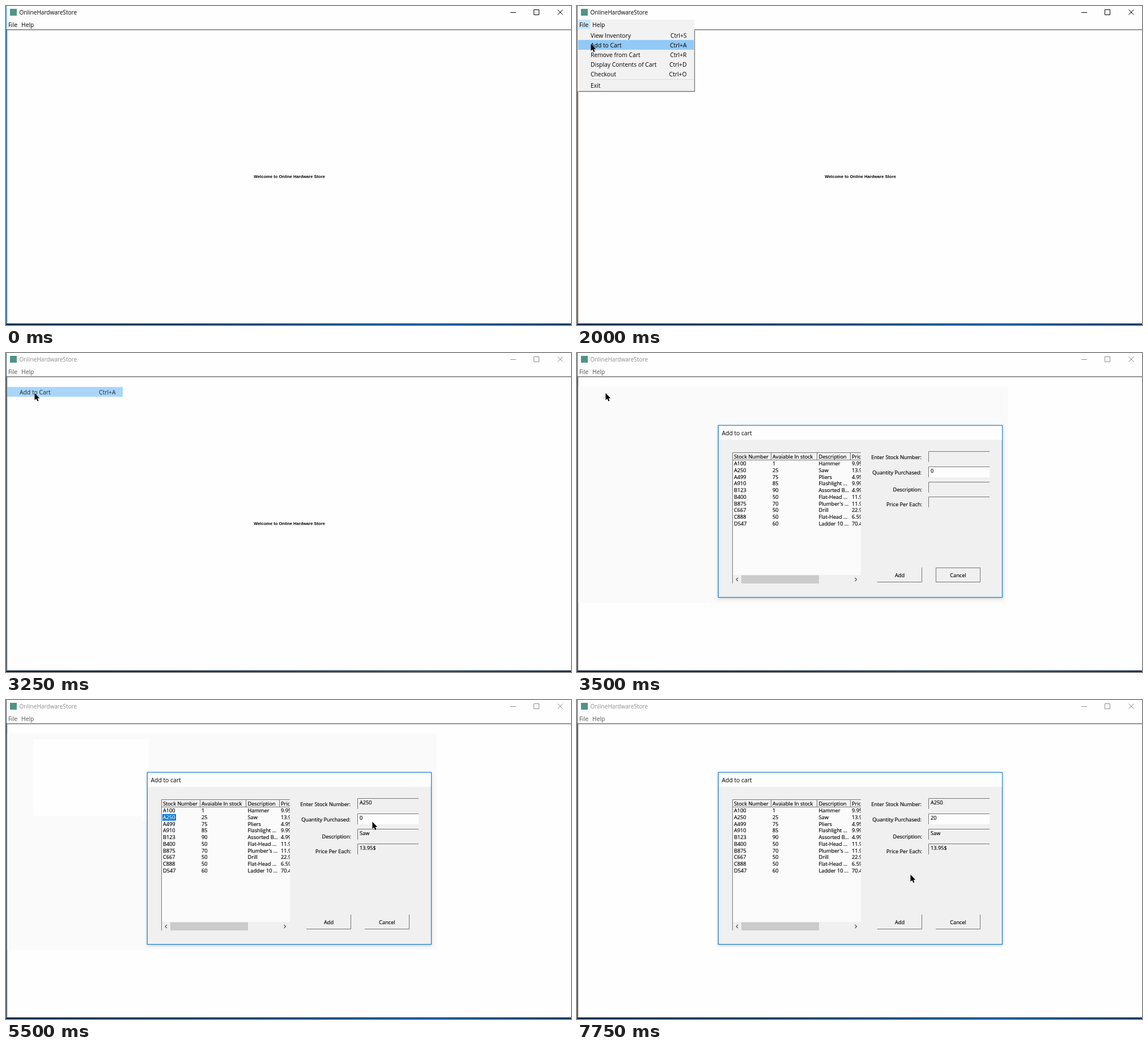
An HTML page that plays this animation: 997 px wide and 562 px high, repeating every 8000 ms.

```html
<!DOCTYPE html>
<html lang="en">
<head>
<meta charset="utf-8">
<title>Hardware store window</title>
<style>
  html, body { margin: 0; width: 100%; height: 100%; overflow: hidden; background: #fff; }
  svg { display: block; width: 997px; height: 562px; }
  text { font: 10.35px "Open Sans", "Noto Sans", sans-serif; fill: #000; white-space: pre; }
  #caption { font-size: 10.05px; }
  .form text { font-size: 9.2px; stroke: #000; stroke-width: .18px; }
  #welcome { font: bold 7.56px "Liberation Sans", Arial, sans-serif; text-anchor: middle; }
  .right { text-anchor: end; }
  .mid { text-anchor: middle; }
  .line { fill: none; stroke: #757575; }
  #controls { fill: none; stroke: #000; }
  #edge { fill: #1a82d4; }
  .inactive #caption { fill: #8c8c8c; }
  .inactive #bar text { fill: #555; }
  .inactive #controls { stroke: #8c8c8c; }
  .inactive #edge { fill: #4a5560; }
  .hidden { display: none; }
</style>
</head>
<body>
<svg id="stage" viewBox="0 0 997 562">
  <defs>
    <linearGradient id="desk">
      <stop offset="0" stop-color="#0a2440"/>
      <stop offset=".35" stop-color="#0a365f"/>
      <stop offset=".75" stop-color="#0f559a"/>
      <stop offset="1" stop-color="#0a3058"/>
    </linearGradient>
    <filter id="shadow" x="-5%" y="-5%" width="110%" height="112%">
      <feDropShadow dx="0" dy="1.5" stdDeviation="2.5" flood-opacity=".2"/>
    </filter>
    <clipPath id="listClip"><rect x="274" y="174" width="227" height="233"/></clipPath>
  </defs>

  <rect width="997" height="562" fill="#fefefe"/>
  <rect x="7" y="5" width="12" height="12" fill="#4f9484"/>
  <text id="caption" x="23.5" y="15.3">OnlineHardwareStore</text>
  <path id="controls" d="M890 11.5H900M931.5 6.5h9v9h-9zM973.5 6.5l9 9m0-9l-9 9"/>
  <path class="line" d="M1 41.8H997M1.5 42V559" stroke-width="1.4"/>
  <path id="edge" d="M0 0H1V560H0zM0 559H997V560H0z"/>
  <rect y="560" width="997" height="2" fill="url(#desk)"/>
  <text id="welcome" x="500" y="303">Welcome to Online Hardware Store</text>

  <g id="wash">
    <rect x="2" y="59" width="758" height="381" fill="#fafafa"/>
    <path id="trail" d="M48 69H252V204H249V214H240V204H48z" fill="#fefefe"/>
  </g>

  <g id="panel">
    <rect x="1" y="24" width="206" height="126" fill="#f2f2f2"/>
    <rect x="2" y="24" width="22" height="17" fill="#cce8ff"/>
    <path d="M23 129.5H205" stroke="#dcdcdc"/>
  </g>
  <path id="frame" class="line" d="M207.5 43V150.5H3" stroke-width="1.3"/>
  <rect id="hover" x="2" width="204" height="17.2"/>
  <g id="items"></g>
  <g id="bar">
    <text x="4" y="37">File</text>
    <text x="27" y="37">Help</text>
  </g>

  <g id="dialog">
    <rect x="249.3" y="127.5" width="501.2" height="303" fill="#f0f0f0" stroke="#137cd2" stroke-width="1.2" filter="url(#shadow)"/>
    <rect x="250" y="128" width="500" height="25" fill="#fdfdfd"/>
    <text x="255.5" y="145">Add to cart</text>
    <g class="form">
      <g clip-path="url(#listClip)">
        <rect x="274" y="175" width="227" height="231" fill="#fbfbfb"/>
        <rect x="275" y="176" width="226" height="13" fill="#f2f2f2"/>
        <path class="line" d="M274.5 406V175.5H501M275 188.5H501M342.5 176v13M423.5 176v13M482.5 176v13"/>
        <rect id="picked" x="276" y="201" width="24" height="11.5" fill="#0078d7"/>
        <g id="list"></g>
        <rect x="275" y="391" width="226" height="15" fill="#f0f0f0"/>
        <rect x="290" y="391.5" width="137" height="14.5" fill="#cbcbcb"/>
        <path d="M284 396l-3 3 3 3M490.5 396l3 3-3 3" fill="none" stroke="#505050" stroke-width="1.2"/>
      </g>
      <g id="fields"></g>
      <path id="caret" d="M624.5 203V213" stroke="#222"/>
      <path class="line" d="M530 403.5H608.5V378M633 403.5H711.5V378"/>
      <rect id="focus" class="line" x="633.5" y="378.5" width="78" height="25"/>
      <text class="mid" x="569.5" y="395.3">Add</text>
      <text class="mid" x="672.5" y="395.3">Cancel</text>
    </g>
  </g>

  <path id="cursor" d="M.5 .5V13L3.4 10.4 5.4 15 7.5 14.1 5.5 9.7H9.3z"
        stroke="#fff" stroke-width=".6" paint-order="stroke"/>
</svg>
<script>
const STEP = 250, COUNT = 32;
const $ = id => document.getElementById(id);
const show = (id, on) => $(id).classList.toggle('hidden', !on);
const text = (x, y, s, attrs = '') => `<text x="${x}" y="${y}" ${attrs}>${s}</text>`;

const commands = [
  ['View Inventory', 'Ctrl+S'], ['Add to Cart', 'Ctrl+A'], ['Remove from Cart', 'Ctrl+R'],
  ['Display Contents of Cart', 'Ctrl+D'], ['Checkout', 'Ctrl+O'], ['Exit', '']
];
$('items').innerHTML = commands.map(([name, key], i) => {
  const y = 55.5 + i * 17.15 + (i === 5 ? 3 : 0);
  return `<g>${text(24, y, name)}${text(193.5, y, key, 'class="right"')}</g>`;
}).join('');

const columns = [277, 345, 426.5, 485];
const stock = `A100|1|Hammer|9.95
A250|25|Saw|13.95
A499|75|Pliers|4.95
A910|85|Flashlight ...|9.99
B123|90|Assorted B...|4.99
B400|50|Flat-Head ...|11.95
B875|70|Plumber's ...|11.95
C667|50|Drill|22.95
C888|50|Flat-Head ...|6.59
D547|60|Ladder 10 ...|70.45`.split('\n').map(r => r.split('|'));
const row = (cells, y) => '<g>' + cells.map((s, i) => text(columns[i], y, s)).join('') + '</g>';
$('list').innerHTML = row(['Stock Number', 'Avaiable In stock', 'Description', 'Price'], 185.8) +
  stock.map((r, i) => row(r, 198.2 + i * 11.72)).join('');
const pickedCell = $('list').children[2].firstChild;

const labels = ['Enter Stock Number:', 'Quantity Purchased:', 'Description:', 'Price Per Each:'];
$('fields').innerHTML = labels.map((s, i) => {
  const top = 173 + i * 27 - (i === 3 ? 1 : 0);
  return text(i < 2 ? 608 : 609, top + (i < 2 ? 13.8 : 16.5), s, 'class="right"') +
    `<rect x="620" y="${top}" width="108" height="19" fill="${i === 1 ? '#fdfdfd' : '#f0f0f0'}"/>
     <path class="line" d="M620.5 ${top + 19}V${top + .5}H728"/>` +
    text(624, top + 11.4, '', `id="value${i}"`);
}).join('');

// Pointer stops: step, x, y; each holds until the next.
const stops = [
  [1, 18, 62], [2, 12, 50], [3, 6, 42], [4, 2, 38], [5, 0, 36], [6, 5, 40],
  [7, 14, 50], [8, 24, 66], [9, 36, 83], [10, 42, 89], [11, 48, 75], [12, 50, 70],
  [15, 240, 186], [16, 284, 204], [17, 285, 205], [18, 287, 207], [19, 330, 216],
  [20, 430, 230], [21, 560, 236], [22, 646, 214], [23, 634, 209], [27, 633, 212],
  [28, 632, 216], [29, 630, 242], [30, 622, 280], [31, 588, 307]
];

function render(n) {
  const at = stops.filter(s => s[0] <= n).pop();
  show('cursor', at);
  if (at) $('cursor').setAttribute('transform', `translate(${at[1]} ${at[2]})`);

  const open = n >= 5 && n <= 12, closing = n === 13;
  const alpha = n === 5 ? .16 : 1;
  show('panel', open);
  show('frame', open);
  show('items', open || closing);
  $('panel').style.opacity = $('items').style.opacity = alpha;
  const hot = closing ? 1 : open && n > 6 ? Math.floor((at[2] - 43) / 17.15) : -1;
  show('hover', hot >= 0);
  $('hover').setAttribute('y', 42.7 + hot * 17.15);
  $('hover').setAttribute('fill', closing ? '#a9d5fa' : '#91c9f7');
  [...$('items').children].forEach((g, i) => {
    g.classList.toggle('hidden', closing && i !== 1);
    g.style.opacity = closing ? .8 : 1;
  });

  $('stage').classList.toggle('inactive', n >= 13);
  show('dialog', n >= 14);
  show('wash', n >= 14 && n < 26);
  show('trail', n >= 15);

  const filled = n >= 17, picked = filled && n < 23;
  show('picked', picked);
  pickedCell.style.fill = pickedCell.style.stroke = picked ? '#fff' : '';
  show('focus', !filled);
  show('caret', n >= 23 && n <= 25);
  const values = filled ? ['A250', n >= 26 ? '20' : '0', 'Saw', '13.95$'] : ['', '0', '', ''];
  values.forEach((v, i) => $('value' + i).textContent = v);
}

let shown = -1;
const start = performance.now();
function tick() {
  const n = Math.floor((performance.now() - start) / STEP) % COUNT;
  if (n !== shown) render(shown = n);
  requestAnimationFrame(tick);
}
tick();
</script>
</body>
</html>
```
